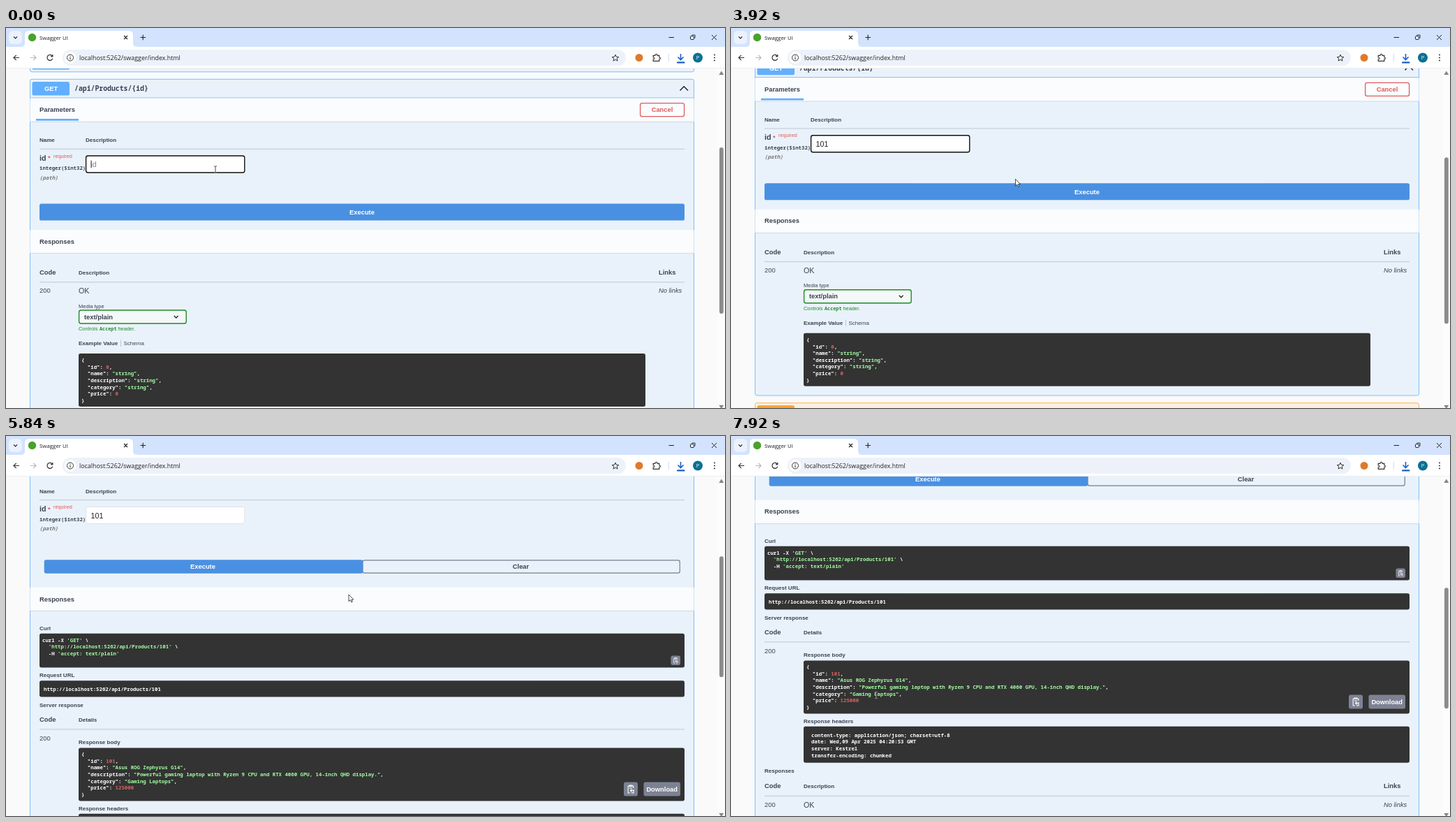
An HTML page that plays this animation: 1030x544 px, repeating every 8 s.

```html
<!DOCTYPE html>
<html lang="en">
<head>
<meta charset="utf-8">
<title>API explorer</title>
<style>
html, body { margin: 0; width: 100%; height: 100%; overflow: hidden; background: #fafafa; }
svg { display: block; width: 1030px; height: 544px; }
text { font-family: "Liberation Sans", Arial, sans-serif; white-space: pre; }
.mono { font-family: "Noto Sans Mono", "DejaVu Sans Mono", monospace; }
.ui { font-family: "Open Sans", "Noto Sans", sans-serif; }
.ibeam { mix-blend-mode: difference; }
</style>
</head>
<body>
<svg id="stage" viewBox="0 0 1030 544"></svg>
<script>
const INK = '#3b4151', BLUE = '#61affe', PANEL = '#e9f2fa', DARK = '#333', RED = '#e25b5b', GREY = '#7d8293';
const S = 8.02, M = 9.36, L = 10.69, CODE = 7.36;

const rect = (x, y, w, h, fill, more = '') =>
  `<rect x="${x}" y="${y}" width="${w}" height="${h}" fill="${fill}" ${more}/>`;
const box = (x, y, w, h, fill, more = '') => rect(x, y, w, h, fill, 'rx="2.7" ' + more);
const path = (d, color, width = 1.2, more = '') =>
  `<path d="${d}" fill="none" stroke="${color}" stroke-width="${width}" ${more}/>`;
const circle = (x, y, r, fill, more = '') => `<circle cx="${x}" cy="${y}" r="${r}" fill="${fill}" ${more}/>`;
// y is the vertical middle of the capitals
const text = (x, y, s, size = S, fill = INK, more = '') =>
  `<text x="${x}" y="${y + size * 0.36}" font-size="${size}" fill="${fill}" ${more}>${s}</text>`;
const bold = (x, y, s, size = S, fill = INK, more = '') => text(x, y, s, size, fill, 'font-weight="700" ' + more);
const mid = (x, y, s, fill = INK) => bold(x, y, s, M, fill, 'text-anchor="middle"');
const mono = (x, y, s, size = CODE, fill = INK, more = '') => bold(x, y, s, size, fill, 'class="mono" ' + more);
const rule = y => rect(48, y, 924, 0.8, '#b4bdc9');
const code = (x, y, lines) => lines.map((line, i) => mono(x, y + i * 9.65,
  line.replace(/(?<=": )("[^"]*"|\d+)|'[^']*'/g,
    m => `<tspan fill="${/\d/.test(m[0]) ? '#d36363' : '#a2fca2'}">${m}</tspan>`), CODE, '#fff')).join('');

const section = (y, title) =>
  rect(34.5, y + 1, 951, 33, '#c9d3dc') + rect(34.5, y, 951, 33.2, '#fafcfe') + bold(48, y + 16.3, title, M);
const clip = (x, y, size) => {
  const k = size / 20;
  return box(x, y, size, size, GREY) + `<g transform="translate(${x} ${y}) scale(${k})">` +
    path('M9 15.5H6.2V5.8H13.8V8.5M8 5.8V4.5H12V5.8M8 8.5H12M14.5 12H9.5M11.5 10L9.5 12L11.5 14M14 10.5V15.5H11', '#fff', 1.1) + '</g>';
};
const badge = (y, verb, color) => box(37.5, y, 53.5, 19.6, color) + mid(64.7, y + 9.8, verb, '#fff');
const responseTable = y =>
  bold(48, y, 'Code', M) + bold(104, y + 0.6, 'Description') + bold(935, y, 'Links', M) + rule(y + 14) +
  text(48, y + 26.5, '200', M) + text(104, y + 27, 'OK', L) +
  text(935, y + 26.5, 'No links', M, INK, 'font-style="italic"');

const browser = () =>
  rect(0, 0, 1030, 28, '#d3e3fd') + rect(4, 4, 19, 19, '#ebf2fe', 'rx="6"') +
  path('M11 12.3L13.5 14.8L16 12.3', '#222') +
  `<path d="M22 27Q27 27 27 21V10Q27 4 33 4H176Q182 4 182 10V21Q182 27 187 27Z" fill="#fff"/>` +
  circle(37.5, 13.5, 5.7, '#4aa22c') + text(48, 14, 'Swagger UI', 7.86, '#222', 'class="ui"') +
  path('M169 11L174 16M174 11L169 16M192.5 13.5H200M196.2 9.7V17.3', '#222', 1.1) +
  path('M949.5 13.5H957M1011 10L1018 17M1018 10L1011 17', '#222', 1) +
  rect(980.5, 11.5, 5, 5, 'none', 'rx="1" stroke="#222"') + path('M982.3 10H987V14.7', '#222', 0.9) +
  rect(0, 27, 1030, 31, '#fff') + rect(0, 57.4, 1030, 0.6, '#dde3ea') +
  rect(81, 31, 807, 23, '#edf2fa', 'rx="11.5"') + circle(92, 42.5, 8.5, '#fff') +
  text(105, 42.5, 'localhost:5262/swagger/index.html', 8.88, '#222', 'class="ui"') +
  path('M19 42.5H11M14.7 38.8L11 42.5L14.7 46.2', '#333') +
  path('M35 42.5H43M39.3 38.8L43 42.5L39.3 46.2', '#b4b8bd') +
  path('M66.2 40A4 4 0 1 0 66.8 43.6M66.8 38V40.8H64', '#333') +
  circle(92, 42.5, 4.5, 'none', 'stroke="#333"') + path('M92 42V45M92 39.8V41', '#333', 1.1) +
  path('M873 38.2L874.4 41.3L877.8 41.6L875.2 43.8L876 47.1L873 45.3L870 47.1L870.8 43.8L868.2 41.6L871.6 41.3Z', '#333', 1) +
  circle(907, 42.5, 5.5, '#df7a2c') +
  path('M927.2 39.3H930Q930 37.3 931.5 37.3Q933 37.3 933 39.3H935.8V42Q937.4 42 937.4 43.3Q937.4 44.8 935.8 44.8V47.3H927.2V44.8Q929 44.8 929 43.3Q929 42 927.2 42Z', '#333', 1.2) +
  rect(948.8, 37, 1, 11, '#c5d8f5') +
  path('M966.5 37V45M962.5 41.5L966.5 45.5L970.5 41.5', '#1a5fc8', 1.6) + rect(961, 48.2, 11.5, 2.4, '#1a5fc8', 'rx="1.2"') +
  circle(991, 42.5, 7, '#0b7193') + text(991, 42.6, 'P', 7.5, '#fff', 'class="ui" text-anchor="middle"') +
  [38.5, 42.5, 46.5].map(y => circle(1015, y, 1, '#333')).join('');

const parameters = () =>
  box(34.5, 20, 951, 42.8, PANEL, `stroke="${BLUE}" stroke-width=".8"`) + badge(40, '', BLUE) +
  badge(77, 'GET', BLUE) + mono(98, 86.8, '/api/Products/{id}', 9.81) +
  path('M965.5 89.5L971.2 83.8L977 89.5', '#222', 1.5) + rect(34.5, 99.6, 951, 0.8, BLUE) +
  section(100.6, 'Parameters') + rect(43, 130, 61, 2.7, BLUE) +
  box(908.6, 107.6, 63, 19, 'none', `stroke="${RED}" stroke-width="1.3"`) + mid(940, 117, 'Cancel', RED) +
  bold(48, 160.3, 'Name') + bold(114, 160.3, 'Description') + rule(172.8) +
  bold(48, 185.7, 'id', L) + bold(60, 186, '*', 9, RED) + text(68, 183, 'required', 7.35, RED) +
  mono(48, 200.5, 'integer($int32)') + mono(48, 214, '(path)', CODE, '#777', 'font-style="italic"') +
  box(114.6, 183, 227.2, 24, '#fff', 'id="field"') +
  text(121.5, 195.2, '', L, INK, 'id="value"') + rect(0, 189.5, 0.8, 11, '#111', 'id="caret"');

const before = () =>
  box(48, 251.6, 924, 24, '#4a90e2', 'id="run"') + mid(510, 263.6, 'Execute', '#fff') +
  section(289, 'Responses') + responseTable(349.5) +
  text(104, 397.8, 'Media type', 7.5) +
  box(104.6, 404, 153.6, 19, '#f4f8f8', 'stroke="#1f8a2a" stroke-width="1.4"') + bold(112, 413.3, 'text/plain', M) +
  path('M240.8 412L243.7 415L246.6 412', '#222', 1.3) +
  text(104, 430.5, 'Controls', 7.35, '#1f8a2a') + mono(134, 430.8, 'Accept', 6.8, '#1f8a2a') + text(160.5, 430.5, 'header.', 7.35, '#1f8a2a') +
  bold(104, 451.3, 'Example Value') + rect(164, 446.5, 0.7, 9.5, '#aab3bf') + text(168.5, 451.3, 'Schema') +
  box(104, 466, 812, 76, DARK) +
  code(108, 475.5, ['{', '  "id": 0,', '  "name": "string",', '  "description": "string",', '  "category": "string",', '  "price": 0', '}']) +
  box(34.5, 566, 951, 27, '#fbf0e2', 'stroke="#fca130" stroke-width=".8"') + badge(569.5, 'PUT', '#fca130') +
  mono(98, 579.3, '/api/Products/{id}', 9.81) + path('M965.5 576L971.2 581.7L977 576', '#222', 1.5);

const after = () =>
  box(511, 178.4, 454.3, 18.2, 'none', 'stroke="#777e8a" stroke-width="1.2"') + box(54.7, 177.8, 456.5, 19.4, '#4a90e2') +
  mid(282, 187.5, 'Execute', '#fff') + mid(737.5, 187.5, 'Clear') +
  section(217.3, 'Responses') + bold(48, 275.6, 'Curl') + box(48, 283.2, 924, 48.8, DARK) +
  code(52, 292.5, ["curl -X 'GET' \\", "  'http://localhost:5262/api/Products/101' \\", "  -H 'accept: text/plain'"]) +
  clip(952.5, 315, 13.5) + bold(48, 343, 'Request URL') + box(48, 350.7, 924, 23.3, DARK) +
  code(54, 362.6, ['http://localhost:5262/api/Products/101']) +
  bold(48, 385.4, 'Server response') + bold(48, 406.4, 'Code', M) + bold(104, 407, 'Details') + rule(420) +
  text(48, 433, '200', M) + bold(104, 439, 'Response body') + box(104, 447, 868, 76, DARK) +
  code(108, 456, ['{', '  "id": 101,', '  "name": "Asus ROG Zephyrus G14",',
    '  "description": "Powerful gaming laptop with Ryzen 9 CPU and RTX 4060 GPU, 14-inch QHD display.",',
    '  "category": "Gaming Laptops",', '  "price": 125000', '}']) +
  clip(885, 496, 20) + box(913.5, 496, 52.5, 20, GREY) + mid(939.7, 506, 'Download', '#fff') +
  bold(104, 534, 'Response headers') + box(104, 541.3, 868, 52, DARK) +
  code(115, 553.5, ['content-type: application/json; charset=utf-8', 'date: Wed,09 Apr 2025 04:20:53 GMT', 'server: Kestrel', 'transfer-encoding: chunked']) +
  bold(48, 605, 'Responses') + responseTable(626.3);

const pointers = () =>
  '<g id="arrow"><path d="M0 0V9.8L2.3 7.7L3.8 11L5.4 10.3L3.9 7.2H6.9Z" fill="#fff" stroke="#222" stroke-width=".8"/></g>' +
  '<g id="hand"><path d="M-1.8 1.5V-5.2Q-1.8 -6 -1 -6Q-.1 -6 -.1 -5.2V-2Q1 -2.6 1.5 -1.6Q2.8 -2.1 3.2 -1.1Q4.7 -1.3 4.7 .3V2.4Q4.7 5.8 1.5 5.8H.5Q-1 5.8 -1.9 4.4L-4 1.5Q-4.2 .2 -3 .3Z" fill="#fff" stroke="#222" stroke-width=".9"/></g>' +
  `<g id="ibeam" class="ibeam">${path('M-2 -4.8Q0 -4.8 0 -3.8V3.8Q0 4.8 -2 4.8M2 -4.8Q0 -4.8 0 -3.8M0 3.8Q0 4.8 2 4.8', '#ccc', 0.9)}</g>`;

const $ = id => document.getElementById(id);
$('stage').innerHTML =
  rect(0, 0, 1030, 544, '#fafafa') +
  '<g id="page">' + box(34.5, 73.3, 951, 482, PANEL, `id="panel" stroke="${BLUE}" stroke-width=".8"`) +
  parameters() + `<g id="before">${before()}</g><g id="after" transform="translate(0 81)">${after()}</g></g>` +
  rect(1019.5, 58, 10.5, 486, '#fcfcfc') + rect(1022, 0, 5.8, 0, '#8b8b8b', 'id="thumb" rx="2.9"') +
  '<path d="M1021.3 67L1024.8 61.5L1028.3 67ZM1021.3 540L1024.8 545L1028.3 540Z" fill="#858585"/>' +
  browser() + pointers();

// piecewise eased value from [time, value] pairs
function at(keys, t) {
  let i = keys.findIndex(k => k[0] > t);
  if (i === 0) return keys[0][1];
  if (i < 0) return keys.at(-1)[1];
  const [t0, a] = keys[i - 1], [t1, b] = keys[i], u = (t - t0) / (t1 - t0);
  return a + (b - a) * u * u * (3 - 2 * u);
}
const scrollKeys = [[3840, 0], [4000, 58.5], [5680, 58.5], [5920, 89.5], [6240, 89.5], [6400, 148], [6640, 148], [6800, 206.5]];
const xKeys = [[3040, 300], [3440, 333], [3600, 333], [4240, 482], [5040, 482], [5360, 491], [6000, 491], [6400, 475], [6960, 475], [7600, 208]];
const yKeys = [[3040, 202.5], [3440, 219.5], [3600, 219.5], [4240, 213], [5040, 213], [5360, 227], [6000, 227], [6400, 332.5], [6960, 332.5], [7600, 371]];
const typing = [[0, ''], [1040, '1'], [1640, '10'], [2040, '101']];

const show = (id, on) => $(id).setAttribute('visibility', on ? 'visible' : 'hidden');
const set = (id, attrs) => { for (const k in attrs) $(id).setAttribute(k, attrs[k]); };

function draw(t) {
  const done = t >= 4960, scroll = at(scrollKeys, t);
  set('page', { transform: `translate(0 ${-scroll})` });
  set('panel', { height: done ? 1000 : 482 });
  show('before', !done);
  show('after', done);
  set('thumb', done ? { y: 172 + (scroll - 81) * 0.36, height: 173 } : { y: 171 + scroll * 0.49, height: 238 });

  const [since, typed] = typing.findLast(k => k[0] <= t);
  $('value').textContent = typed || 'id';
  set('value', { fill: typed ? '#222' : '#858585' });
  set('caret', { x: 121.6 + typed.length * 5.94 });
  show('caret', t < 4800 && Math.floor((t - since) / 500) % 2 === 0);
  set('field', done ? { stroke: '#d9d9d9', 'stroke-width': 0.7 } : { stroke: '#111', 'stroke-width': 1.4 });

  const kind = t < 3200 || t >= 7360 ? 'ibeam' : t >= 4000 && t < 5120 ? 'hand' : 'arrow';
  for (const id of ['ibeam', 'hand', 'arrow']) show(id, id === kind);
  set(kind, { transform: `translate(${at(xKeys, t)} ${at(yKeys, t)})` });
  $('run').style.filter = kind === 'hand' ? 'drop-shadow(0 0 1.5px rgba(0,0,0,.4))' : '';
}

const start = performance.now();
function tick() {
  draw(Math.floor((performance.now() - start) % 8000 / 80) * 80);
  requestAnimationFrame(tick);
}
tick();
</script>
</body>
</html>
```
